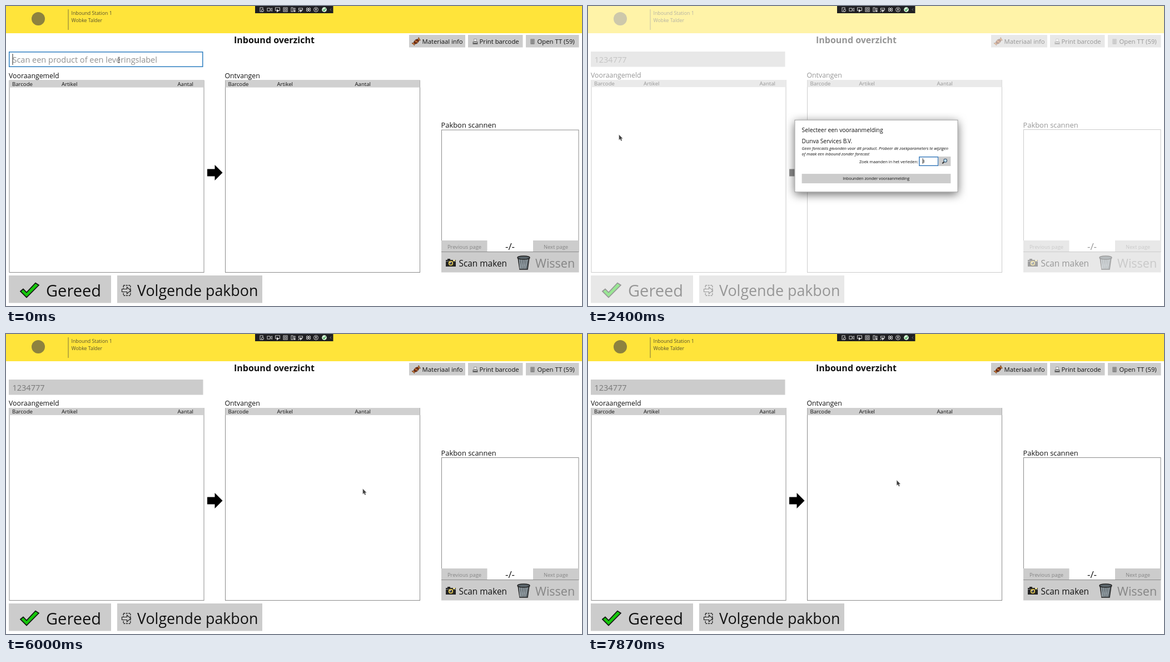
Write an HTML page with a canvas that moves like this. It is 1036 by 540 pixels and loops after 8 s.

```html
<!DOCTYPE html>
<html lang="nl">
<head>
<meta charset="utf-8">
<title>Inbound overzicht</title>
<style>
html, body { margin: 0; width: 100%; height: 100%; overflow: hidden; background: #fff; }
canvas { display: block; }
</style>
</head>
<body>
<canvas id="stage" width="1036" height="540"></canvas>
<script>
const c = document.getElementById('stage').getContext('2d');
const LOOP = 8000, GREY = '#cccccc', FONT = '"Open Sans", "Noto Sans", sans-serif';
const clamp = v => Math.max(0, Math.min(1, v));

function text(s, x, y, size, color = '#111', style = '', align = 'left') {
  c.font = `${style} ${size}px ${FONT}`;
  c.fillStyle = color;
  c.textAlign = align;
  c.fillText(s, x, y);
}

function box(x, y, w, h, fill, stroke, line = 1) {
  if (fill) { c.fillStyle = fill; c.fillRect(x, y, w, h); }
  if (stroke) {
    c.strokeStyle = stroke;
    c.lineWidth = line;
    c.strokeRect(x + line / 2, y + line / 2, w - line, h - line);
  }
}

function poly(points, fill, stroke, line = 1, closed = true) {
  c.beginPath();
  points.forEach(([x, y]) => c.lineTo(x, y));
  if (closed) c.closePath();
  if (fill) { c.fillStyle = fill; c.fill(); }
  if (stroke) { c.strokeStyle = stroke; c.lineWidth = line; c.stroke(); }
}

function disc(x, y, r, fill, stroke, line = 1) {
  c.beginPath();
  c.arc(x, y, r, 0, Math.PI * 2);
  if (fill) { c.fillStyle = fill; c.fill(); }
  if (stroke) { c.strokeStyle = stroke; c.lineWidth = line; c.stroke(); }
}

function at(x, y, draw, angle = 0) {
  c.save();
  c.translate(x, y);
  c.rotate(angle);
  draw();
  c.restore();
}

// Icons, each drawn around its own centre
function candy() {
  poly([[-3, 0], [-8, -3], [-7, 3]], '#d98032', '#5a2a12', .7);
  poly([[3, 0], [8, -3], [7, 3]], '#d98032', '#5a2a12', .7);
  c.beginPath();
  c.ellipse(0, 0, 4.8, 3.3, 0, 0, 7);
  c.fillStyle = '#7b3218';
  c.fill();
  c.strokeStyle = '#35160a';
  c.stroke();
  poly([[-1, -3], [1, 3]], null, '#e09a4c', 1.2, false);
}

function printer() {
  box(-2.5, -5, 5, 5, '#fff', '#666', .7);
  box(-4.5, 0, 9, 4, '#777');
  box(-3, 1, 6, 1, '#ddd');
  box(-4.5, 3.6, 9, 1, '#333');
}

function sheet() {
  box(-3.5, -4.5, 7, 9, '#aaa', '#777', .7);
  for (let y = -3; y < 4; y += 2) box(-2.5, y, 5, .8, '#666');
}

function camera() {
  box(-9, -5, 18, 12, '#252525');
  box(-6, -7, 5, 2, '#252525');
  box(-9, -3, 18, 1.2, '#777');
  box(4, -5, 4, 2, '#f4e58b');
  disc(0, 1, 4.8, '#f0d45c', '#111', 1);
  disc(0, 1, 2.6, '#34383c');
  disc(-1, 0, .9, '#fff');
}

function trash() {
  poly([[-10, -9], [10, -9], [7, 12], [-7, 12]], '#7b878e', '#222', 1.5);
  for (let x = -7; x <= 7; x += 3.5) {
    poly([[x, -8], [x * .7 + 2, 11]], null, '#30383c', .8, false);
    poly([[x, -8], [x * .7 - 2, 11]], null, '#c3cbd0', .8, false);
  }
  c.beginPath();
  c.ellipse(0, -9, 11, 3, 0, 0, 7);
  c.fillStyle = '#5c666c';
  c.fill();
  c.strokeStyle = '#222';
  c.lineWidth = 1.5;
  c.stroke();
}

function check() {
  poly([[-16, 2], [-11, -2], [-5, 4], [11, -13], [17, -9], [-5, 13]], '#16c60c', '#111', 1.7);
}

function nextSheet() {
  c.setLineDash([3, 1.5]);
  box(-7, -10, 14, 20, null, '#222', 1.4);
  c.setLineDash([]);
  poly([[-9, -2.5], [0, -2.5], [0, -6], [7, 0], [0, 6], [0, 2.5], [-9, 2.5]], GREY, '#222', 1.2);
}

function magnifier() {
  poly([[-4, 4], [0, 0]], null, '#333', 2, false);
  disc(1.3, -1.3, 2.9, '#bfe0f5', '#37516b', 1);
}

function toolbar() {
  box(448, 0, 140.5, 13, '#1f1f22');
  const w = '#dedede';
  at(460, 6.5, () => { box(-3.5, -4, 6, 8, null, w, .9); disc(1.5, 1.5, 2, '#1f1f22', w, .9); });
  at(474, 6.5, () => { box(-4.5, -3, 6, 6, null, w, .9); poly([[2, -1], [4.5, -3], [4.5, 3], [2, 1]], null, w, .8); });
  at(488, 6.5, () => { box(-4, -4, 9, 6, null, w, .9); poly([[-1, -1], [-1, 5], [3, 2]], w); });
  at(502.5, 6.5, () => { box(-4, -4, 8, 8, null, w, .9); box(-2, -2, 4, 4, null, w, .9); });
  at(516.5, 6.5, () => { box(-4, -4, 4, 8, null, w, .9); box(1, -3, 3, 3, null, w, .8); box(1, 1, 3, 3, w); });
  at(530, 6.5, () => { box(-4, -3, 8, 4, null, w, .9); poly([[-1, 0], [-1, 5], [3, 2]], w); poly([[-4, 4], [-2, 2]], null, w, 1); });
  at(544, 6.5, () => {
    for (const s of [-2, 2]) { disc(s, -1.5, 1.6, null, w, 1); disc(s, 1.5, 1.6, null, w, 1); }
  });
  at(557.5, 6.5, () => {
    disc(0, 0, 4, null, w, .9);
    box(-2, -1.5, 4, .9, w);
    box(-.5, -2.5, 1, 3, w);
    poly([[-1.5, 2.5], [0, 0], [1.5, 2.5]], null, w, .8, false);
  });
  disc(572.5, 6.5, 4.4, '#d5eed5');
  poly([[570.3, 6.6], [572, 8.4], [575, 4.4]], null, '#2d9a43', 1.4, false);
  poly([[585, 4.5], [583, 6.5], [585, 8.5]], null, '#999', .8, false);
}

function list(x, w, title, columns, dy) {
  text(title, x - .5, 129.2 + dy, 12.3);
  box(x, 133 + dy, w, 347 - dy, '#fff', '#8b8b8b');
  box(x + .5, 133 + dy, w - 1, 13, '#d0d0d0');
  ['Barcode', 'Artikel', 'Aantal'].forEach((s, i) => text(s, columns[i], 143.4 + dy, 9.6));
}

function searchField(t) {
  if (t >= 2070) {
    box(5, 82, 349.5, 27.5, GREY);
    text('1234777', 11.5, 101.5, 14.5, '#787878');
    return;
  }
  box(5, 82, 349.5, 28, '#fff', '#2f7fc1', 1.5);
  if (t < 1200) {
    text('Scan een product of een leveringslabel', 11.5, 102, 14.5, '#8f8f8f');
    box(11.5, 86, 1, 20, '#222');
    return;
  }
  const typed = '1234777'.slice(0, t < 1267 ? 3 : t < 1327 ? 5 : 7);
  text(typed, 11.5, 101.5, 14.5);
  box(12 + c.measureText(typed).width, 86, 1, 19, '#222');
  poly([[339.7, 94], [344.3, 98.6]], null, '#666', .9, false);
  poly([[344.3, 94], [339.7, 98.6]], null, '#666', .9, false);
}

function page(t) {
  const dy = t < 1200 ? .6 : 0;
  box(0, 0, 1036, 540, '#fff');
  box(0, 0, 1036, 49, '#ffe43a');
  disc(58, 23, 12, '#8d823f');
  box(111.5, 6, 1, 37, '#7d733a');
  text('Inbound Station 1', 117.5, 16, 8.8, '#57522f');
  text('Wobke Talder', 117.5, 29, 8.8, '#57522f');
  text('Inbound overzicht', 410, 67.3, 16, '#111', 'bold');

  box(725, 52, 101, 22.5, GREY);
  box(831, 52, 98.5, 22.5, GREY);
  box(935, 52, 95.5, 22.5, GREY);
  at(738, 64, candy, -.7);
  at(844, 64, printer);
  at(947, 64, sheet);
  text('Materiaal info', 748.5, 68, 11.3);
  text('Print barcode', 851.5, 68, 11.3);
  text('Open TT (59)', 955.5, 68, 11.3);

  searchField(t);
  list(5.5, 351, 'Vooraangemeld', [11, 100, 308.5], dy);
  list(394, 351, 'Ontvangen', [399.5, 487.5, 627.5], dy);
  poly([[362, 293.5], [375.5, 293.5], [375.5, 286], [389.5, 300], [375.5, 314], [375.5, 306.5], [362, 306.5]], '#000');

  text('Pakbon scannen', 782.5, 218.6 + dy, 12.9);
  box(783, 222 + dy, 247.5, 221 - dy, '#fff', '#8b8b8b');
  box(783, 422, 82.5, 20, GREY);
  box(948, 422, 82.5, 20, GREY);
  text('Previous page', 824.5, 436.5, 9.4, '#858585', '', 'center');
  text('Next page', 989, 436.5, 9.4, '#858585', '', 'center');
  text('-/-', 906.5, 439, 17, '#111', '', 'center');
  box(783, 443, 247.5, 36.5, GREY);
  at(800, 462, camera);
  at(931, 462, trash);
  text('Scan maken', 814.5, 468.5, 15.4);
  text('Wissen', 952, 470.8, 21.5, '#858585');

  box(5, 485, 184, 49.5, GREY);
  box(200, 485, 261, 49.5, GREY);
  at(42, 511.5, check);
  at(217.5, 512, nextSheet);
  text('Gereed', 72, 522.6, 29);
  text('Volgende pakbon', 236, 522, 26.8);
}

function panel(x, y, w, h) {
  c.save();
  c.shadowColor = 'rgba(0,0,0,.6)';
  c.shadowBlur = 16;
  c.shadowOffsetY = 4;
  box(x, y, w, h, '#fff');
  c.restore();
  box(x, y, w, h, null, '#858585', .8);
  text('Selecteer een vooraanmelding', x + 13, y + 22, 10.3);
  text('Dunva Services B.V.', x + 13, y + 42.5, 10.1);
}

// Label, month field, search button and the wide button below
function searchRow(labelX, fieldX, y, value, border, left, right) {
  text('Zoek maanden in het verleden:', labelX, y + 11.6, 7.3);
  box(fieldX, y, 35, 17, '#fff', border, 1.4);
  text(value, fieldX + 6, y + 11, 7.6);
  box(fieldX + 35, y, 22, 17, GREY);
  at(fieldX + 46, y + 8.5, magnifier);
  box(left, y + 31, right - left, 17, GREY);
  text('Inbounden zonder vooraanmelding', 518.3, y + 42.3, 7.25, '#111', '', 'center');
}

function emptyDialog(t) {
  panel(372, 205, 293, 130);
  text('Geen forecasts gevonden voor dit product. Probeer de zoekparameters te wijzigen', 385, 259, 7.35, '#111', 'italic');
  text('of maak een inbound zonder forecast', 385, 269, 7.35, '#111', 'italic');
  const value = t < 4330 ? '3' : t < 4400 ? '' : t < 4730 ? '3' : '36';
  searchRow(488, 595, 271, value, '#2f74b8', 385, 652);
  const caretX = t < 4330 ? 601.5 : 601.5 + value.length * 4.4;
  box(caretX, 274, .9, 10, '#222');
}

function resultDialog() {
  panel(423, 192, 190, 157);
  text('test123', 443, 254, 7.2, '#111', 'bold');
  text('Vooraangemeld:  1', 443, 263, 6.3, '#222', 'italic');
  text('24-11-2021', 593, 264.7, 7.4, '#555', '', 'right');
  c.save();
  c.beginPath();
  c.rect(436, 264, 164, 9);
  c.clip();
  text('Verwerkt:  0', 443, 273.2, 6.3, '#222', 'italic');
  text('Leverancier:', 557, 273.2, 6.3, '#222', 'italic');
  c.restore();
  searchRow(436, 543, 284, '36', '#8b8b8b', 436, 600);
}

function modal(t, start, end, draw) {
  if (t < start || t > end + 260) return;
  const age = t - start, leave = clamp((t - end) / 250);
  c.globalAlpha = .56 * clamp(age / 145) * (1 - leave);
  box(0, 0, 1036, 540, '#fff');
  c.globalAlpha = clamp(age / 195) * (1 - leave);
  const scale = 1 + .06 * Math.exp(-age / 65) + .03 * leave;
  c.save();
  c.translate(518.3, 270);
  c.scale(scale, scale);
  c.translate(-518.3, -270);
  draw(t);
  c.restore();
  c.globalAlpha = 1;
}

const route = [
  [0, 203, 97], [60, 203, 97], [240, 172, 150], [430, 90, 260], [600, 12, 310], [760, 45, 250], [930, 55.5, 231.5],
  [2420, 55.5, 231.5], [2700, 270, 300], [3070, 581, 288], [3270, 602, 279], [4970, 602, 279],
  [5090, 686, 270], [5200, 652, 281.5], [5470, 641.5, 278.5], [6310, 641.5, 278.5], [6400, 639, 281],
  [6850, 639, 281], [7250, 545, 258], [7480, 545, 258], [7730, 554.5, 262.5], [7870, 555, 263], [8000, 555, 263]
];

function pointer(t) {
  const i = route.findIndex(p => p[0] > t);
  const [t0, x0, y0] = route[i - 1], [t1, x1, y1] = route[i];
  const u = (t - t0) / (t1 - t0), k = u * u * (3 - 2 * u);
  const x = x0 + (x1 - x0) * k, y = y0 + (y1 - y0) * k;
  at(x, y, () => {
    if (t < 110 || (t > 3200 && t < 5000)) {
      box(-.4, -5, .9, 10, '#333');
      box(-2, -5.2, 4, .8, '#555');
      box(-2, 4.6, 4, .8, '#555');
    } else {
      poly([[.3, .3], [.3, 9.6], [2.4, 7.8], [4, 11.2], [5.6, 10.4], [4.1, 7.2], [6.8, 7]], '#3c3c3c', '#aaa', .5);
    }
  });
}

function frame(now) {
  const t = now % LOOP;
  page(t);
  modal(t, 2205, 5630, emptyDialog);
  modal(t, 6655, 7480, resultDialog);
  toolbar();
  pointer(t);
  requestAnimationFrame(frame);
}

const origin = performance.now();
frame(0);
function tick() { }
</script>
</body>
</html>
```
